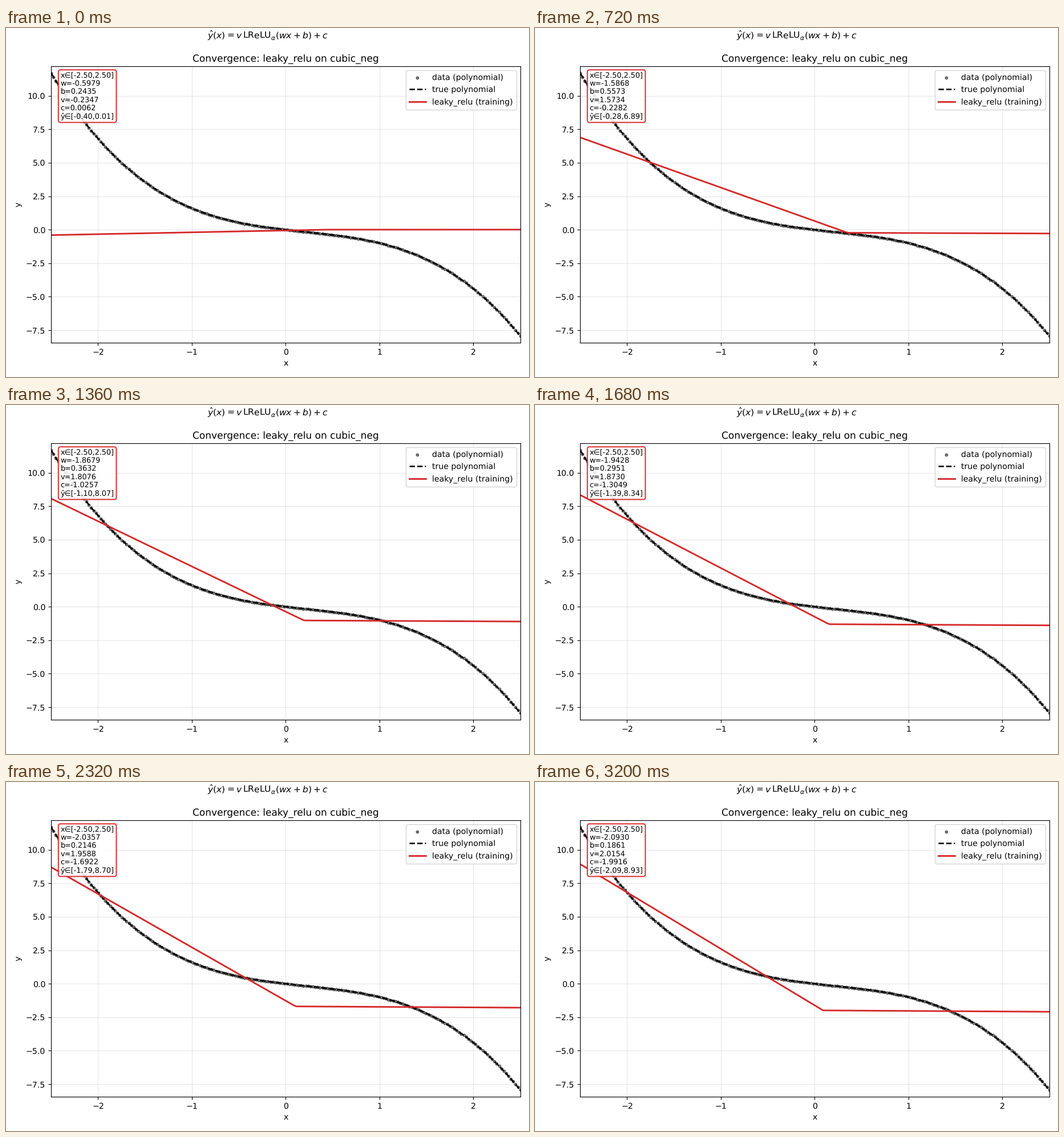
Write a matplotlib script that moves like this. It is 917x611 px and loops after 3280 ms.

```python
import matplotlib.pyplot as plt
import numpy as np
from matplotlib.animation import FuncAnimation

plt.rcParams.update({"text.hinting": "no_hinting", "axes.labelpad": 4.5})

W, H, DPI = 917, 611, 101.89
FRAMES, INTERVAL = 41, 80
STEPS, RATE, ALPHA = 25, 0.002, 0.01
START = (-0.5979, 0.2435, -0.2347, 0.0062)  # w, b, v, c
RED = "tab:red"

X = np.linspace(-2.5, 2.5, 200)
Y = -0.5 * X**3 + 0.3 * X**2 - 0.8 * X


def predict(p):
    w, b, v, c = p
    z = w * X + b
    return v * np.where(z > 0, z, ALPHA * z) + c


def descend(p):
    """One full-batch gradient step on the mean squared error."""
    w, b, v, _ = p
    z = w * X + b
    slope = np.where(z > 0, 1.0, ALPHA)
    err = predict(p) - Y
    back = err * v * slope
    grad = [np.mean(g) for g in (back * X, back, err * slope * z, err)]
    return p - 2 * RATE * np.array(grad)


def train():
    history = [np.array(START)]
    while len(history) < FRAMES:
        p = history[-1]
        for _ in range(STEPS):
            p = descend(p)
        history.append(p)
    return history


history = train()

# The tiny margin keeps the pixel size from rounding down.
fig = plt.figure(figsize=((W + 1e-6) / DPI, (H + 1e-6) / DPI), dpi=DPI)
left, right, top, bottom = 79.2, 901.7, 67.4, 551
ax = fig.add_axes([left / W, 1 - bottom / H, (right - left) / W, (bottom - top) / H])

fig.suptitle(r"$\hat{y}(x) = v\,\mathrm{LReLU}_{\alpha}(wx+b)+c$", fontsize=11, y=0.9965)
ax.set_title("Convergence: leaky_relu on cubic_neg")
ax.set(xlabel="x", ylabel="y", xlim=(-2.5, 2.5), ylim=(Y.min() - 0.5, Y.max() + 0.5))
ax.grid(alpha=0.3)

ax.scatter(X, Y, s=10, color="black", alpha=0.5, label="data (polynomial)")
ax.plot(X, Y, "k--", lw=1.8, label="true polynomial")
(fit,) = ax.plot(X, predict(START), color=RED, lw=2, label="leaky_relu (training)")
ax.legend(loc="upper right", labelspacing=0.55, borderpad=0.42)

info = ax.text(
    0.02, 0.98, "", transform=ax.transAxes, va="top", fontsize=9, linespacing=1.17,
    bbox=dict(boxstyle="round,pad=0.3", fc="white", ec=RED, lw=1.5, alpha=0.9),
)


def draw(i):
    p = history[i]
    y = predict(p)
    fit.set_ydata(y)
    lines = [f"x∈[{X[0]:.2f},{X[-1]:.2f}]"]
    lines += [f"{name}={value:.4f}" for name, value in zip("wbvc", p)]
    lines.append(f"ŷ∈[{y.min():.2f},{y.max():.2f}]")
    info.set_text("\n".join(lines))
    return fit, info


anim = FuncAnimation(fig, draw, frames=FRAMES, interval=INTERVAL, repeat=True)
plt.show()
```
